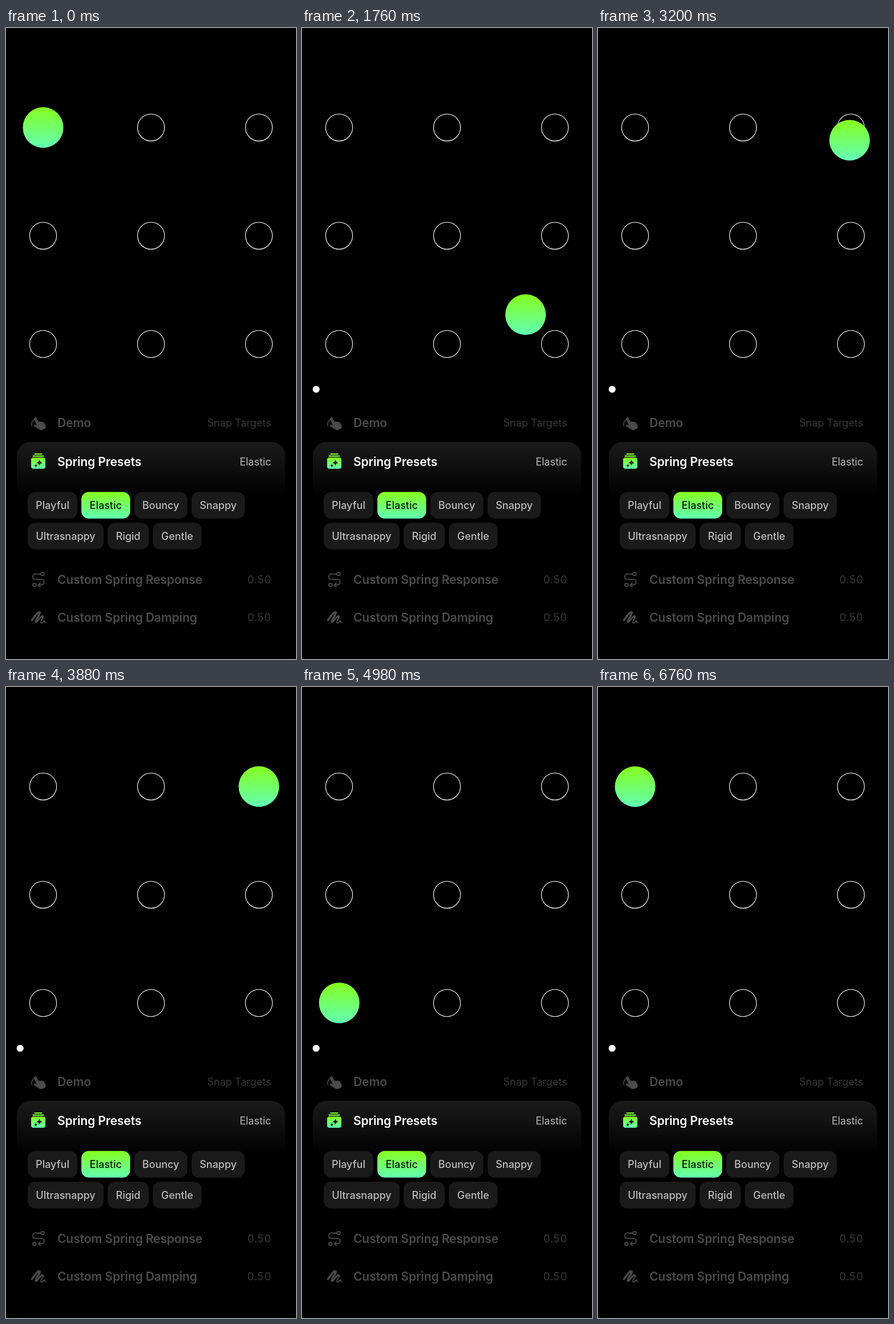
These frames come from a looping animation (508 by 1102 pixels, 6970 ms). An HTML page:

```html
<!DOCTYPE html>
<html lang="en">
<head>
<meta charset="utf-8">
<title>Snap targets</title>
<style>
  html, body { margin: 0; width: 100%; height: 100%; overflow: hidden; background: #000; }
  svg { display: block; width: 100%; height: 100%; font-family: Inter, "Noto Sans", sans-serif; }
  .title { font-size: 21px; font-weight: 600; letter-spacing: -0.1px; }
  .value { font-size: 18px; text-anchor: end; }
  .number { font-size: 19px; font-variant-numeric: tabular-nums; }
  .chip { font-size: 18px; font-weight: 500; text-anchor: middle; }
  .line { fill: none; stroke-linecap: round; stroke-linejoin: round; }
</style>
</head>
<body>
<svg viewBox="0 0 508 1102" xmlns="http://www.w3.org/2000/svg">
  <defs>
    <linearGradient id="green" x1="0" y1="0" x2="0" y2="1">
      <stop offset="0" stop-color="#85ff1e"/>
      <stop offset="1" stop-color="#62ffb4"/>
    </linearGradient>
    <linearGradient id="card" x1="0" y1="0" x2="0" y2="1">
      <stop offset="0" stop-color="#1b1b1b"/>
      <stop offset="1" stop-color="#000"/>
    </linearGradient>
  </defs>
  <rect width="508" height="1102"/>
  <g id="rings" fill="none" stroke="#fff" stroke-width="1.1"/>
  <circle id="dot" cx="24.8" cy="631" r="6.1" fill="#fff"/>
  <path d="M19 820V747a24 24 0 0 1 24-24H465a24 24 0 0 1 24 24V820Z" fill="url(#card)"/>

  <!-- pointing hand -->
  <g fill="#4a4a4a">
    <path class="line" d="M45 694.500A13 13 0 0 1 51 682" style="fill:none" stroke="#4a4a4a" stroke-width="1.7"/>
    <path d="M50.500 680.300c1.400-.8 2.700-.1 3.300 1.200l3.300 6.700c.6-1.200 2.400-1.500 3.300-.2c1-1 2.600-.8 3.200.5c1.300-.7 2.800-.1 3.400 1.200l2 4.200c1.200 2.800.5 5.300-2.200 6.700c-4 2-7.500 1.600-10.700-.6l-6.300-4.200c-1.800-1.400-.4-3.600 1.800-2.900l2.400.8l-4.600-10c-.7-1.400-.4-2.700.9-3.400Z"/>
  </g>

  <!-- stacked cards with sparkles -->
  <g fill="url(#green)">
    <rect x="49.500" y="743" width="14" height="2" rx="1" fill="#83ff25"/>
    <rect x="46.500" y="746.600" width="20" height="2.200" rx="1.100" fill="#7fff39"/>
    <rect x="44" y="750.300" width="25" height="19.400" rx="4"/>
    <path d="M58.500 753.500q.7 5 5.500 5.700q-4.800.7-5.500 5.700q-.7-5-5.500-5.700q4.800-.7 5.500-5.700ZM52.300 761.200q.4 2.700 3 3.100q-2.600.4-3 3.100q-.4-2.700-3-3.100q2.600-.4 3-3.100Z" fill="#000"/>
  </g>

  <!-- winding route -->
  <g class="line" stroke="#4a4a4a" stroke-width="1.900">
    <circle cx="64" cy="953.500" r="2.900"/>
    <circle cx="49.800" cy="972.500" r="2.900"/>
    <path d="M60.500 953.500H51.500a4.700 4.700 0 0 0 0 9.400H62a4.800 4.800 0 0 1 0 9.600H57M60 969.300L56.500 972.500L60 975.700"/>
  </g>

  <!-- scribble -->
  <g class="line" stroke="#4a4a4a">
    <path d="M45.500 1034C49 1029 53 1023 56.500 1020.800C59.500 1019 60 1021.500 58 1025C55.500 1029.500 51.500 1035 52 1037.300" stroke-width="3.600"/>
    <path d="M52 1037.300C54 1039 58 1030.500 62.500 1027.500C65 1026 65.500 1028 64 1030.500" stroke-width="2.800"/>
    <path d="M64 1030.500C62 1034 60 1038.500 62 1039C64 1039.300 65 1035.500 67 1035.500C68.600 1035.700 66.500 1039 69 1038.500" stroke-width="1.900"/>
  </g>

  <g id="labels"/>
  <circle id="ball" r="35.5" fill="url(#green)"/>
</svg>
<script>
const LOOP = 6970;
const COLS = [65, 254, 443];
const ROWS = [173.8, 362.8, 551.9];
const byId = id => document.getElementById(id);

function add(parent, tag, attrs, text) {
  const node = document.createElementNS("http://www.w3.org/2000/svg", tag);
  for (const key in attrs) node.setAttribute(key, attrs[key]);
  if (text) node.textContent = text;
  byId(parent).append(node);
}

for (const cy of ROWS) for (const cx of COLS) add("rings", "circle", { cx, cy, r: 23.6 });

function row(y, title, value, titleColor, valueColor, extra = "") {
  add("labels", "text", { x: 90, y, class: "title", fill: titleColor }, title);
  add("labels", "text", { x: 464.500, y: y - 0.7, class: "value " + extra, fill: valueColor }, value);
}
row(697, "Demo", "Snap Targets", "#4b4b4b", "#393939");
row(765, "Spring Presets", "Elastic", "#fff", "#b8b8b8");
row(970.5, "Custom Spring Response", "0.50", "#4b4b4b", "#393939", "number");
row(1036.5, "Custom Spring Damping", "0.50", "#4b4b4b", "#393939", "number");

function chip(label, left, right, y) {
  const active = label === "Elastic";
  add("labels", "rect", {
    x: left, y, width: right - left, height: 46.5, rx: 13,
    fill: active ? "url(#green)" : "#1a1a1a"
  });
  add("labels", "text", {
    x: (left + right) / 2, y: y + 30, class: "chip", fill: active ? "#071a04" : "#bcbcbc"
  }, label);
}
chip("Playful", 38, 125, 810.3);
chip("Elastic", 132, 217.5, 810.3);
chip("Bouncy", 224.5, 317.7, 810.3);
chip("Snappy", 325, 418.3, 810.3);
chip("Ultrasnappy", 38, 171, 864);
chip("Rigid", 178, 250, 864);
chip("Gentle", 257, 342.5, 864);

// Each flick: finger drag from touch to release, then a spring towards cell `to`.
// `origin` and `reach` give the time and offset at which the spring would be at rest.
const flicks = [
  { touch: 300, release: 400, origin: [333, 333], reach: [-126, -123], from: [0, 0], to: [1, 1] },
  { touch: 1640, release: 1740, origin: [1660, 1660], reach: [-100, -100], from: [1, 1], to: [2, 2] },
  { touch: 2790, release: 2900, origin: [2825, 2825], reach: [-23, 224], from: [2, 2], to: [2, 0] },
  { touch: 3920, release: 4040, origin: [3966, 3977], reach: [224, -212], from: [2, 0], to: [0, 2] },
  { touch: 5660, release: 5800, origin: [5745, 5745], reach: [20, 240], from: [0, 2], to: [0, 0] }
];

// Response 0.5 s, damping ratio 0.5.
const OMEGA = 2 * Math.PI / 0.5, ZETA = 0.5, ROOT = Math.sqrt(1 - ZETA * ZETA);
function spring(ms) {
  const t = ms / 1000, a = OMEGA * ROOT * t;
  return Math.exp(-ZETA * OMEGA * t) * (Math.cos(a) + ZETA / ROOT * Math.sin(a));
}

// The ball bounces off the outer rows and columns.
function fold(v, lo, hi) {
  return v < lo ? 2 * lo - v : v > hi ? 2 * hi - v : v;
}

function along(flick, axis, t) {
  const grid = axis ? ROWS : COLS;
  const start = grid[flick.from[axis]], target = grid[flick.to[axis]];
  const sprung = ms => target + flick.reach[axis] * spring(ms - flick.origin[axis]);
  let v;
  if (t < flick.release) {
    const span = flick.release - flick.touch, u = (t - flick.touch) / span;
    const end = sprung(flick.release), slope = sprung(flick.release + 1) - end;
    v = start + (end - start) * u * u * (3 - 2 * u) + slope * span * u * u * (u - 1);
  } else {
    v = sprung(t);
  }
  return fold(v, grid[0], grid[2]);
}

const ball = byId("ball"), dot = byId("dot");
function draw(t) {
  const flick = flicks.filter(f => f.touch <= t).pop();
  ball.setAttribute("cx", flick ? along(flick, 0, t) : COLS[0]);
  ball.setAttribute("cy", flick ? along(flick, 1, t) : ROWS[0]);
  dot.setAttribute("visibility", flick && t >= flick.release ? "visible" : "hidden");
}

const begin = performance.now();
function tick() {
  draw((performance.now() - begin) % LOOP);
  requestAnimationFrame(tick);
}
tick();
</script>
</body>
</html>
```
